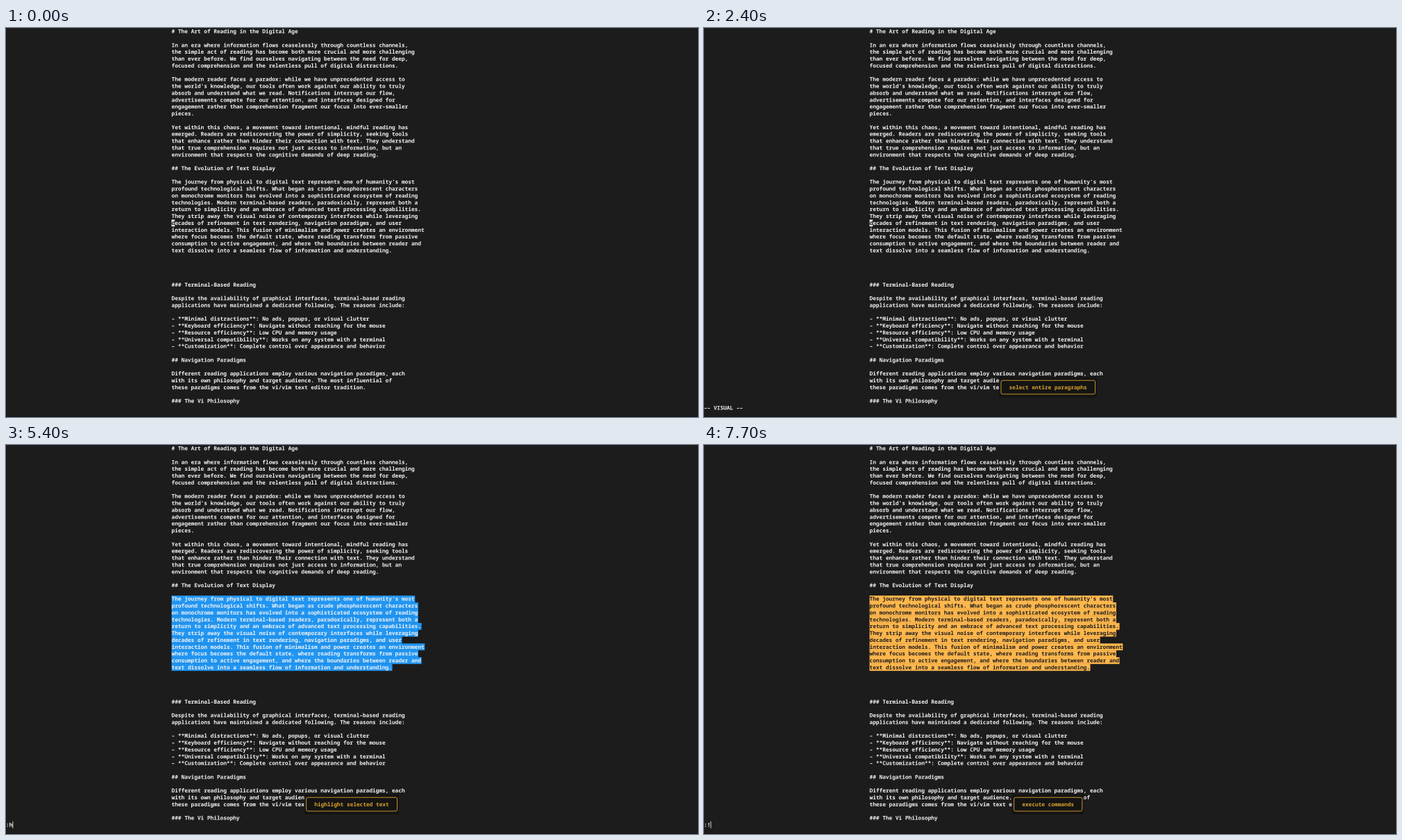
These frames come from a looping animation (997x561 px, 8000 ms). An HTML page with a canvas:

```html
<!DOCTYPE html>
<html lang="en">
<head>
<meta charset="utf-8">
<title>Terminal reader</title>
<style>
html, body { margin: 0; width: 100%; height: 100%; overflow: hidden; background: #1c1c1c; }
canvas { display: block; }
</style>
</head>
<body>
<canvas id="stage" width="997" height="561"></canvas>
<script>
const W = 997, H = 561, LOOP = 8000, SCALE = 2;
const CW = 4.677, RH = 9.87, BASE = 7.6;   // cell width, row height, baseline
const LEFT = 51;                           // first text column
const PARA = [22, 32], CURSOR_ROW = 28;
const FONT = '7.795px "Noto Sans Mono", "DejaVu Sans Mono", monospace';
const BG = '#1c1c1c', FG = '#f2f2f2', BLUE = '#2196f3', ORANGE = '#ffb74d', AMBER = '#d8a12c';

// The screen is drawn large and scaled down, so text can sit between pixels.
const stage = document.getElementById('stage').getContext('2d');
const screen2x = document.createElement('canvas');
screen2x.width = W * SCALE;
screen2x.height = H * SCALE;
const ctx = screen2x.getContext('2d');
ctx.scale(SCALE, SCALE);
ctx.textRendering = 'geometricPrecision';
ctx.fontKerning = 'none';

const page = `# The Art of Reading in the Digital Age

In an era where information flows ceaselessly through countless channels,
the simple act of reading has become both more crucial and more challenging
than ever before. We find ourselves navigating between the need for deep,
focused comprehension and the relentless pull of digital distractions.

The modern reader faces a paradox: while we have unprecedented access to
the world's knowledge, our tools often work against our ability to truly
absorb and understand what we read. Notifications interrupt our flow,
advertisements compete for our attention, and interfaces designed for
engagement rather than comprehension fragment our focus into ever-smaller
pieces.

Yet within this chaos, a movement toward intentional, mindful reading has
emerged. Readers are rediscovering the power of simplicity, seeking tools
that enhance rather than hinder their connection with text. They understand
that true comprehension requires not just access to information, but an
environment that respects the cognitive demands of deep reading.

## The Evolution of Text Display

The journey from physical to digital text represents one of humanity's most
profound technological shifts. What began as crude phosphorescent characters
on monochrome monitors has evolved into a sophisticated ecosystem of reading
technologies. Modern terminal-based readers, paradoxically, represent both a
return to simplicity and an embrace of advanced text processing capabilities.
They strip away the visual noise of contemporary interfaces while leveraging
decades of refinement in text rendering, navigation paradigms, and user
interaction models. This fusion of minimalism and power creates an environment
where focus becomes the default state, where reading transforms from passive
consumption to active engagement, and where the boundaries between reader and
text dissolve into a seamless flow of information and understanding.




### Terminal-Based Reading

Despite the availability of graphical interfaces, terminal-based reading
applications have maintained a dedicated following. The reasons include:

- **Minimal distractions**: No ads, popups, or visual clutter
- **Keyboard efficiency**: Navigate without reaching for the mouse
- **Resource efficiency**: Low CPU and memory usage
- **Universal compatibility**: Works on any system with a terminal
- **Customization**: Complete control over appearance and behavior

## Navigation Paradigms

Different reading applications employ various navigation paradigms, each
with its own philosophy and target audience. The most influential of
these paradigms comes from the vi/vim text editor tradition.

### The Vi Philosophy`.split('\n');

// Each entry holds from its time until the next one.
const captions = [[0, ''], [1700, 'select entire paragraphs'],
  [4200, 'highlight selected text'], [7000, 'execute commands']];
const statuses = [[0, ''], [2200, '-- VISUAL --'], [4700, ':'], [4900, ':h'],
  [5700, ''], [7500, ':'], [7700, ':!']];
const marks = [[0, null], [4200, BLUE], [5700, ORANGE]];

const at = (track, t) => track.filter(k => k[0] <= t).pop()[1];

function cells(col, row, w, h, color) {
  ctx.fillStyle = color;
  ctx.fillRect(col * CW, row * RH, w * CW, h * RH);
}

// Hyphens are shown as wide dashes, as in many terminal fonts.
function write(text, col, row, color) {
  ctx.font = '700 ' + FONT;
  ctx.fillStyle = color;
  ctx.fillText(text.replace(/-/g, '–'), col * CW, row * RH + BASE);
}

function drawPage(mark, cursor) {
  page.forEach((line, row) => {
    const marked = mark && row >= PARA[0] && row <= PARA[1];
    if (marked) cells(LEFT, row, line.length, 1, mark);
    write(line, LEFT, row, marked && mark === ORANGE ? BG : FG);
  });
  if (cursor) {
    cells(LEFT, CURSOR_ROW, 1, 1, '#ececec');
    write(page[CURSOR_ROW][0], LEFT, CURSOR_ROW, BG);
  }
}

function drawCaption(text) {
  const w = text.length + 6, col = 106 - Math.floor(w / 2), row = 51;
  cells(col, row, w, 3, '#141414');
  ctx.strokeStyle = '#c8942a';
  ctx.lineWidth = 1;
  ctx.beginPath();
  ctx.roundRect((col + .5) * CW, (row + .5) * RH, (w - 1) * CW, 2 * RH, 2.5);
  ctx.stroke();
  write(text, col + 3, row + 1, AMBER);
}

function drawStatus(text) {
  write(text, 0, 55, FG);
  if (text[0] === ':') {
    ctx.fillStyle = '#d8d8d8';
    ctx.fillRect(text.length * CW, 55 * RH, 1, RH);
  }
}

function draw(t) {
  const caption = at(captions, t);
  ctx.fillStyle = BG;
  ctx.fillRect(0, 0, W, H);
  ctx.fillStyle = '#121212';
  ctx.fillRect(W - 1, 0, 1, H);
  ctx.fillRect(0, H - 1, W, 1);
  drawPage(at(marks, t), t < 4700);
  if (caption) drawCaption(caption);
  drawStatus(at(statuses, t));
  stage.drawImage(screen2x, 0, 0, W, H);
}

const start = performance.now();
function tick() {
  draw((performance.now() - start) % LOOP);
  requestAnimationFrame(tick);
}
tick();
</script>
</body>
</html>
```
